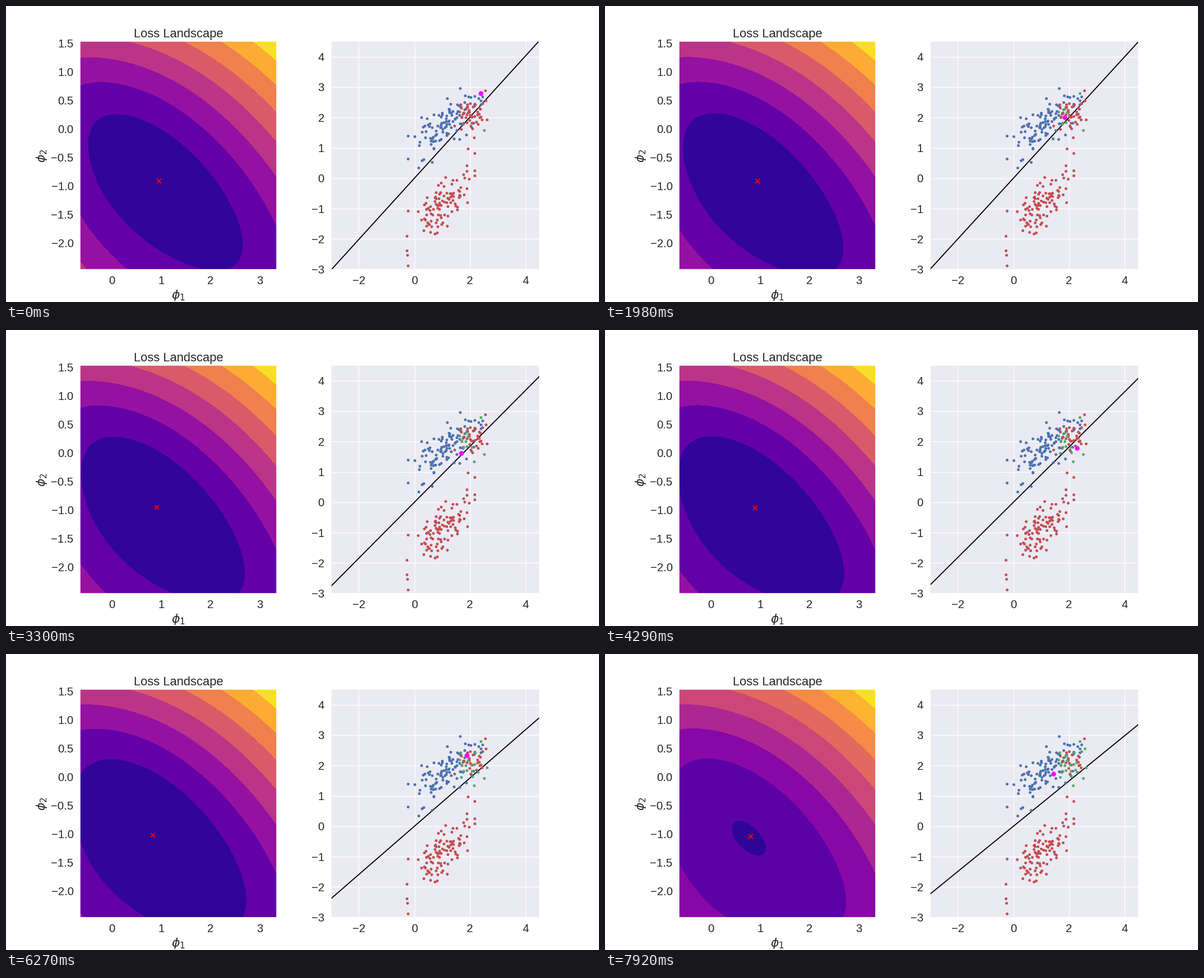
A matplotlib script that plays this animation: 1058 by 529 pixels, repeating every 8000 ms.

```python
import numpy as np
import matplotlib.pyplot as plt
from matplotlib.animation import FuncAnimation

W, H, DPI = 1058, 529, 92
K = 23 / 24                      # point scale for this dpi
LOOP, INTERVAL, HOLD = 8000, 50, 330
STEPS = 25
SPLIT = 20                       # first step whose loss dips below FLOOR
FLOOR, BAND, PENALTY = 0.4, 0.4, 0.045
INK = "0.15"
BLUE, RED, GREEN = "#4C72B0", "#C44E52", "#55A868"

plt.rcParams.update({
    "font.family": "Liberation Sans",
    "text.color": INK, "axes.labelcolor": INK,
    "xtick.color": INK, "ytick.color": INK,
    "axes.titlesize": 18 * K, "axes.labelsize": 18 * K,
    "xtick.labelsize": 16.5 * K, "ytick.labelsize": 16.5 * K,
    "axes.titlepad": 6 * K, "axes.labelpad": 4 * K,
    "axes.facecolor": "#EAEAF2", "axes.edgecolor": "white",
    "axes.linewidth": 1.25 * K, "axes.axisbelow": True,
    "axes.grid": True, "grid.color": "white", "grid.linewidth": K,
    "xtick.major.size": 6 * K, "ytick.major.size": 6 * K,
    "xtick.major.pad": 3.5 * K, "ytick.major.pad": 3.5 * K,
    "xtick.bottom": False, "ytick.left": False,
})

# Stage boxes of the two plots
LEFT, RIGHT = (132.25, 482.6), (579.5, 952.2)
TOP, BOTTOM = 63.5, 470.8
PHI1 = [(x - 188.8) / 88.0 for x in LEFT]
PHI2 = [(219.6 - y) / 101.9 for y in (BOTTOM, TOP)]

rng = np.random.default_rng(4)


def cluster(n, mean, std, corr):
    """Gaussian cloud with exact mean and spread and a trimmed rim."""
    z = np.clip(rng.normal(size=(n, 2)), -2.3, 2.3)
    z = (z - z.mean(axis=0)) / z.std(axis=0)
    z[:, 1] = corr * z[:, 0] + np.sqrt(1 - corr ** 2) * z[:, 1]
    return np.array(mean) + z * std


blue = cluster(110, (1.14, 1.8), (0.6, 0.55), 0.75)
low_red = cluster(105, (1.0, -0.85), (0.55, 0.62), 0.75)
top_red = cluster(50, (2.05, 2.1), (0.28, 0.3), 0.0)
count = len(blue) + len(low_red) + len(top_red)

# Logistic loss over the weight plane; one top red point drops out per step
p1, p2 = np.meshgrid(np.linspace(*PHI1, 140), np.linspace(*PHI2, 140))


def cost(point, sign):
    return np.logaddexp(0, -sign * (p1 * point[0] + p2 * point[1])) / count


total = PENALTY * (p1 ** 2 + p2 ** 2)
total += sum(cost(p, -1) for p in blue)
total += sum(cost(p, 1) for p in np.vstack([low_red, top_red]))
losses = []
for point in top_red[:STEPS]:
    total = total - cost(point, 1)
    losses.append(total)
shift = FLOOR - 0.0015 - losses[SPLIT].min()

# Slope of the decision line: a few key steps, linear in between
slopes = np.interp(np.arange(STEPS), (0, 4, 10, 16, 19, 24),
                   (1.009, 1.04, 0.923, 0.897, 0.796, 0.746))

fig = plt.figure(figsize=(W / DPI, H / DPI), dpi=DPI, facecolor="white")


def add_plot(span):
    return fig.add_axes([span[0] / W, 1 - BOTTOM / H,
                         (span[1] - span[0]) / W, (BOTTOM - TOP) / H])


# Loss landscape
ax = add_plot(LEFT)
ax.set_title("Loss Landscape")
ax.set_xlabel(r"$\phi_1$", labelpad=3 * K)
ax.set_ylabel(r"$\phi_2$")

scenes = []
for loss in losses:
    field = np.minimum(loss + shift, FLOOR + 7.99 * BAND)
    low = -1 if field.min() < FLOOR else 0
    scenes.append(ax.contourf(p1, p2, field, cmap="plasma", visible=False,
                              levels=FLOOR + BAND * np.arange(low, 9))
                  if False else
                  ax.contourf(p1, p2, field, cmap="plasma",
                              levels=FLOOR + BAND * np.arange(low, 9)))

cross, = ax.plot([], [], "x", color="red", ms=6 * K, mew=1.5 * K, zorder=5)
ax.set_xticks(range(4))
ax.set_yticks(np.arange(-2, 1.6, 0.5))
ax.set_xlim(*PHI1)
ax.set_ylim(*PHI2)

# Point clouds and decision line
bx = add_plot(RIGHT)
bx.set_xlim(-3, 4.5)
bx.set_ylim(-3, 4.5)
bx.set_xticks([-2, 0, 2, 4])
bx.set_yticks(range(-3, 5))
ends = np.array([-3, 4.5])
line, = bx.plot([], [], color="black", lw=1.5 * K)


def dots(color, pts=np.empty((0, 2)), size=6):
    return bx.plot(*pts.T, ".", color=color, ms=size * K, mew=K)[0]


dots(BLUE, blue)
dots(RED, low_red)
waiting = dots(RED)
done = dots(GREEN)
current = dots("magenta", size=12)


def draw(i):
    step = min((i * INTERVAL + INTERVAL - 1) // HOLD, STEPS - 1)
    for n, scene in enumerate(scenes):
        scene.set_visible(n == step)
    slope = slopes[step]
    line.set_data(ends, slope * ends)
    # The weights stand almost at a right angle to the line
    weights = np.array([1.03 * slope, -1])
    weights *= 1.32 / np.hypot(*weights)
    cross.set_data(weights[:1], weights[1:])
    n = step + 1
    done.set_data(*top_red[:n].T)
    waiting.set_data(*top_red[n:].T)
    current.set_data(*top_red[n:n + 1].T)
    return []


anim = FuncAnimation(fig, draw, frames=LOOP // INTERVAL, interval=INTERVAL,
                     init_func=lambda: draw(0), repeat=True)
plt.show()
```
